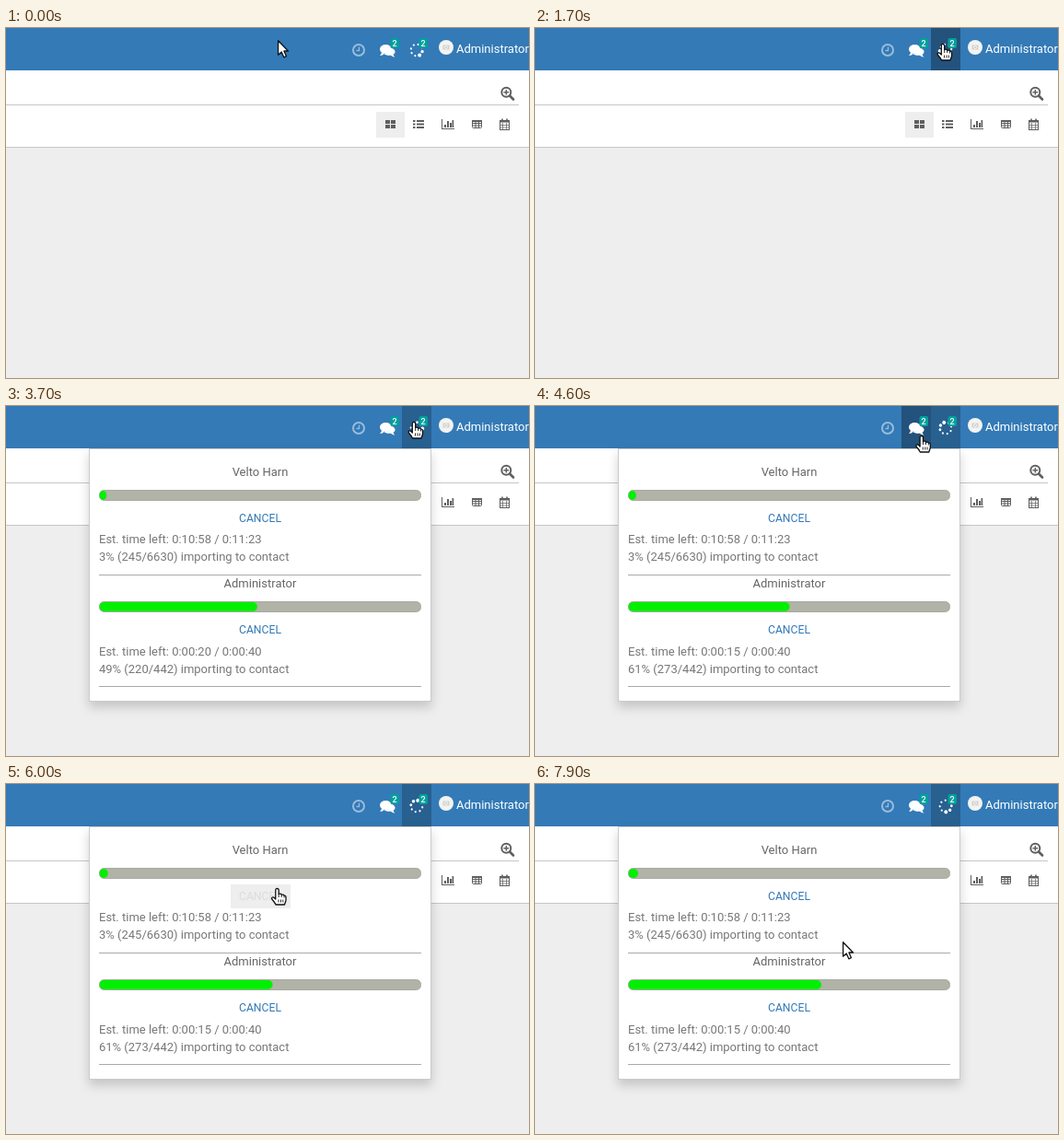
These frames come from a looping animation (568x380 px, 8000 ms). An HTML page:

```html
<!DOCTYPE html>
<html lang="en">
<head>
<meta charset="utf-8">
<title>Import progress</title>
<style>
html, body { margin: 0; width: 100%; height: 100%; overflow: hidden; background: #eee; }
svg { display: block; width: 568px; height: 380px; }
text { font: 13px Roboto, "Open Sans", sans-serif; }
.badge { font-size: 9px; font-weight: 500; fill: #fff; text-anchor: middle; }
.title { fill: #666; text-anchor: middle; }
.info { fill: #777; }
.cancel { font-size: 12.2px; text-anchor: middle; }
.panel { filter: drop-shadow(0 6px 6px rgba(0, 0, 0, .175)); }
</style>
</head>
<body>
<svg viewBox="0 0 568 380">
  <rect width="568" height="380" fill="#eee"/>
  <rect y="46" width="568" height="83" fill="#fff"/>
  <path d="M0 83.5H557M0 129.5H568" stroke="#c6c6c6"/>
  <rect width="568" height="46" fill="#337ab7"/>
  <g id="items"></g>

  <g fill="none" stroke="#99bcdb">
    <circle cx="383" cy="24" r="6" stroke-width="2"/>
    <path d="M383.5 20.5V24.5H380.5" stroke-width="1.3"/>
  </g>
  <g fill="#fff">
    <path d="M417 21.5c7 1 6.500 6 3.500 7.300q.4 1.700 2 2.700q-2.700.2-4.500-1.800c-3 .5-6-.2-7.500-1.700c5 0 8-3 6.500-6.500z"/>
    <ellipse cx="412.400" cy="23" rx="6.400" ry="5"/>
    <path d="M408 26q0 2.500-2 4q3 0 5-2.300z"/>
  </g>
  <g id="spinner" fill="#fff"></g>
  <g id="badges"></g>
  <circle cx="478" cy="21" r="8" fill="#f3f3f1"/>
  <path d="M474.500 18.500h7v5h-7z" fill="#d2d2d0"/>
  <circle cx="478" cy="21" r="1.600" fill="#d2d2d0" stroke="#f3f3f1" stroke-width=".8"/>
  <text x="489" y="27" fill="#fff">Administrator</text>

  <g fill="none" stroke="#5f5f5f" stroke-width="2">
    <circle cx="543.300" cy="69.800" r="5"/>
    <path d="M547 73.500l4 4" stroke-width="2.600" stroke-linecap="round"/>
    <path d="M540.500 69.800h5.600M543.300 67v5.600" stroke-width="1.400"/>
  </g>

  <rect x="402" y="91" width="31" height="28" fill="#eee"/>
  <g fill="#5f5f5f">
    <path d="M412 100h5v4h-5zM418 100h5v4h-5zM412 105h5v4h-5zM418 105h5v4h-5z"/>
    <path d="M442 100h2.500v2h-2.500zM442 103.500h2.500v2h-2.500zM442 107h2.500v2h-2.500zM446 100h8v2h-8zM446 103.500h8v2h-8zM446 107h8v2h-8z"/>
    <path d="M473 99h1v10h13v1h-14zM476 105h2v3h-2zM479 101h2v7h-2zM482 103h2v5h-2zM484.500 100h1.700v8h-1.700z"/>
  </g>
  <g fill="none" stroke="#5f5f5f">
    <rect x="506.500" y="100.500" width="10" height="8" rx="1"/>
    <path d="M506 101h11" stroke-width="2"/>
    <path d="M506 103.500h11M506 106h11M510 101v8M513.500 101v8"/>
    <rect x="536.500" y="100.500" width="10" height="10"/>
    <path d="M536 101.500h11" stroke-width="2"/>
    <path d="M539 98.500v3M544 98.500v3" stroke-width="1.600"/>
    <path d="M536 105.500h11M536 108h11M539.500 103v8M543.500 103v8" stroke-width=".7"/>
  </g>

  <g id="popup">
    <rect class="panel" x="90.500" y="46.500" width="371" height="274" fill="#fff" stroke="#ccc"/>
    <g id="jobs"></g>
  </g>

  <g id="cursor" fill="#fff" stroke="#111" stroke-width="1.300" stroke-linejoin="round">
    <path id="arrow" d="M.6 .8V16.200L4.200 13L6.800 18.800L9.400 17.600L6.900 12H11.500Z"/>
    <g id="hand">
      <path d="M-1.700 10V1.500Q-1.700 0 0 0T1.700 1.500V6Q4.200 5 4.700 6.800Q7 6 7.500 7.600Q9.500 7.200 9.500 9.500V13L8 17.500H-1.500Q-3 14.500-5.500 11.800Q-6.500 10-5 9.500Q-3.600 9-1.700 11.500Z"/>
      <path d="M1.700 6V9.500M4.700 6.800V9.500M7.500 7.600V10M1.500 12V15M4 12V15M6.300 12V15" fill="none" stroke-width=".9"/>
    </g>
  </g>
</svg>
<script>
const LOOP = 8000, STEP = 100, OPEN = 1800;
const $ = id => document.getElementById(id);
const set = (node, attrs) => {
  for (const key in attrs) node.setAttribute(key, attrs[key]);
  return node;
};
const add = (parent, tag, attrs, text = '') => {
  const node = set(document.createElementNS('http://www.w3.org/2000/svg', tag), attrs);
  node.textContent = text;
  return parent.appendChild(node);
};
const show = (node, on) => node.setAttribute('visibility', on ? 'visible' : 'hidden');
const linear = u => u;
const smooth = u => u * u * (3 - 2 * u);

// Keys are [time, ...values]; values hold before the first and after the last key.
function sample(keys, t, ease = linear) {
  const next = keys.findIndex(key => key[0] > t);
  if (next === 0) return keys[0].slice(1);
  if (next < 0) return keys.at(-1).slice(1);
  const a = keys[next - 1], b = keys[next];
  const u = ease((t - a[0]) / (b[0] - a[0]));
  return a.slice(1).map((v, i) => v + (b[i + 1] - v) * u);
}

const cursorPath = [
  [100, 295, 13], [900, 443, 17.5], [4400, 443, 17.5], [5200, 294.5, 113.5],
  [6100, 294.5, 113.5], [6600, 299, 140], [7700, 334, 171]
];

const jobs = [
  {
    name: 'Velto Harn', top: 0, infoTop: 0, changeAt: 3600,
    ends: [[1800, 109], [3700, 109.3], [7900, 112]],
    before: ['0:10:59 / 0:11:19', '2% (197/6630)'],
    after: ['0:10:58 / 0:11:23', '3% (245/6630)']
  },
  {
    name: 'Administrator', top: 121, infoTop: 122, changeAt: 4200,
    ends: [[1800, 261], [2400, 267], [3700, 273], [4200, 274], [5300, 281], [6600, 297], [7900, 311]],
    before: ['0:00:20 / 0:00:40', '49% (220/442)'],
    after: ['0:00:15 / 0:00:40', '61% (273/442)']
  }
];

const items = [[368, 30], [398, 32], [430, 32]].map(([x, width]) =>
  ({ x, width, node: add($('items'), 'rect', { x, width, height: 46 }) }));

for (const x of [422, 453]) {
  add($('badges'), 'rect', { x: x - 4.5, y: 11, width: 9.5, height: 11, rx: 2, fill: '#00a09d' });
  add($('badges'), 'text', { x, y: 20, class: 'badge' }, '2');
}

[1.1, 1.1, 1.1, 1.1, 1.1, 1.4, 1.7, 2].forEach((r, i) => {
  const angle = i * Math.PI / 4;
  add($('spinner'), 'circle', { cx: 6.3 * Math.cos(angle), cy: 6.3 * Math.sin(angle), r });
});

for (const job of jobs) {
  const g = $('jobs'), y = job.top;
  add(g, 'text', { x: 276, y: y + 76, class: 'title' }, job.name);
  add(g, 'rect', { x: 101.5, y: y + 91.5, width: 349, height: 11, rx: 5, fill: '#b0b3a5', stroke: '#a9aaa3' });
  job.fill = add(g, 'rect', { x: 101.5, y: y + 92, height: 10, rx: 5, fill: '#00f000' });
  job.button = add(g, 'rect', { x: 244, y: y + 109, width: 65, height: 26, fill: '#eee' });
  job.label = add(g, 'text', { x: 276, y: y + 126, class: 'cancel' }, 'CANCEL');
  job.lines = [149, 168].map(base =>
    add(g, 'text', { x: 101, y: job.infoTop + base, class: 'info' }));
  add(g, 'path', { d: `M101 ${y + 183.5}H451`, stroke: '#aaa' });
}

function draw(t) {
  const [x, y] = sample(cursorPath, t, smooth);
  const open = t >= OPEN;
  let pointing = false;

  items.forEach((item, i) => {
    const hover = y < 46 && x >= item.x && x < item.x + item.width;
    const active = open && i === 2;
    pointing ||= hover;
    item.node.setAttribute('fill', active ? '#286090' : hover ? '#23527c' : '#337ab7');
  });

  for (const job of jobs) {
    const hover = open && x > 244 && x < 309 && y > job.top + 109 && y < job.top + 135;
    const [time, count] = t < job.changeAt ? job.before : job.after;
    pointing ||= hover;
    job.fill.setAttribute('width', sample(job.ends, t)[0] - 101.5);
    job.button.setAttribute('opacity', hover ? 1 : 0);
    job.label.setAttribute('fill', hover ? '#dcdcdc' : '#337ab7');
    job.lines[0].textContent = `Est. time left: ${time}`;
    job.lines[1].textContent = `${count} importing to contact`;
  }

  show($('popup'), open);
  show($('hand'), pointing);
  show($('arrow'), !pointing);
  $('cursor').setAttribute('transform', `translate(${x} ${y})`);
  $('spinner').setAttribute('transform', `translate(446 24) rotate(${105 + t / 1300 * 360})`);
}

const start = performance.now();
function tick() {
  const t = (performance.now() - start) % LOOP;
  draw(Math.floor(t / STEP) * STEP);
  requestAnimationFrame(tick);
}
tick();
</script>
</body>
</html>
```
